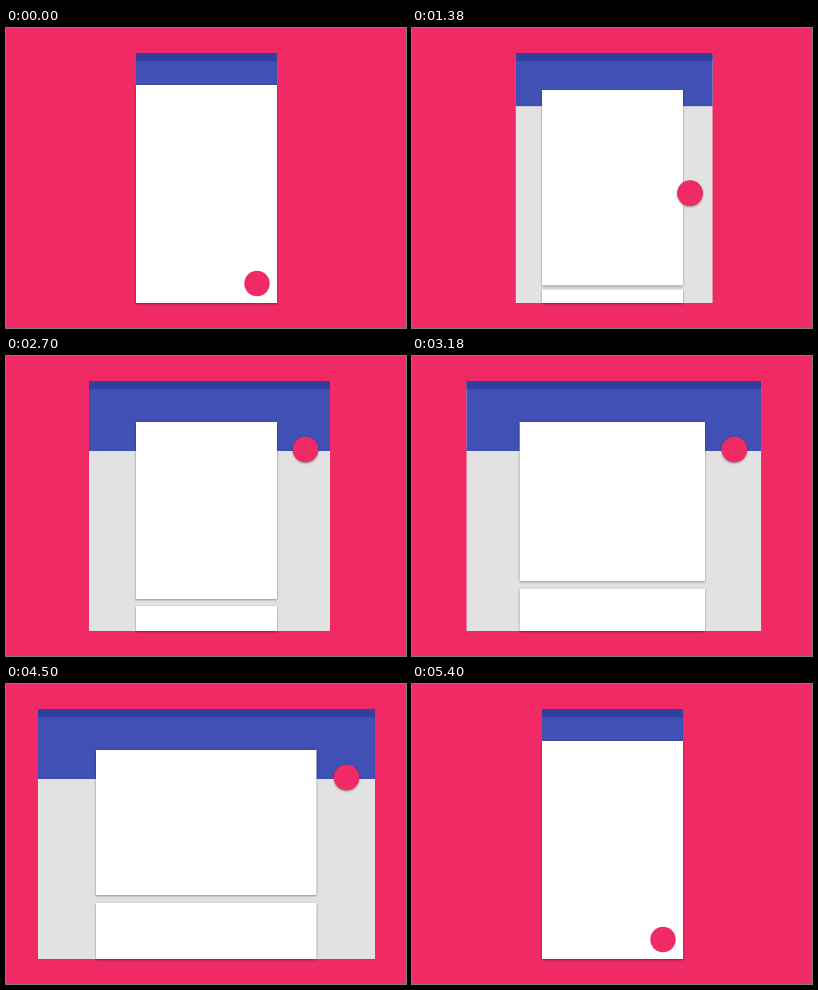
Recreate the animation shown at these times as an HTML page. Size 400x300 px, loop 7.2 s.

```html
<!DOCTYPE html>
<html lang="en">
<head>
<meta charset="utf-8">
<title>Responsive layout</title>
<style>
html, body { margin: 0; width: 100%; height: 100%; overflow: hidden; background: #f02a65; }
svg { display: block; width: 100%; height: 100%; }
</style>
</head>
<body>
<svg viewBox="0 0 400 300">
  <defs>
    <filter id="shade" filterUnits="userSpaceOnUse" x="0" y="0" width="400" height="300" color-interpolation-filters="sRGB">
      <feDropShadow dx="0" dy="0.8" stdDeviation="0.8" flood-color="#000" flood-opacity="0.42"/>
    </filter>
    <linearGradient id="soft" x1="0" y1="0" x2="0" y2="1">
      <stop offset="0" stop-color="#dcdcdc"/>
      <stop offset="1" stop-color="#fff"/>
    </linearGradient>
  </defs>
  <rect width="400" height="300" fill="#f02a65"/>
  <rect id="page" fill="#e2e2e2"/>
  <rect id="toolbar" fill="#4150b5"/>
  <rect id="status" fill="#3040a0"/>
  <rect id="lower" fill="#fff" filter="url(#shade)"/>
  <rect id="edge" fill="url(#soft)"/>
  <rect id="card" fill="#fff" filter="url(#shade)"/>
  <circle id="fabShade" r="12.7" fill="#f02a65" filter="url(#shade)"/>
  <circle id="fab" r="12.7" fill="#f02a65"/>
</svg>
<script>
const LOOP = 7200, STEP = 30, MOVE = 900, TOP = 25, BOTTOM = 275;
const STARTS = [900, 2700, 4500];

const phone = { left: 130, right: 271, bar: 57, cardL: 130, cardR: 271, cardT: 57, cardB: 275.5, lowerT: 276, fabX: 251, fabY: 255.5, lift: 0 };
const tablet = { left: 83, right: 324, bar: 95, cardL: 130, cardR: 271, cardT: 66, cardB: 243, lowerT: 250, fabX: 299.5, fabY: 93.5, lift: 1 };
const desktop = { left: 32, right: 369, bar: 95, cardL: 90, cardR: 310.5, cardT: 66, cardB: 211, lowerT: 219, fabX: 340.5, fabY: 93.5, lift: 1 };
const layouts = [phone, tablet, desktop, phone];

const el = id => document.getElementById(id);

function set(id, attrs) {
  for (const key in attrs) el(id).setAttribute(key, attrs[key]);
}

function box(id, x1, y1, x2, y2) {
  set(id, { x: x1, y: y1, width: x2 - x1, height: Math.max(0, y2 - y1) });
}

// cubic-bezier(.42, 0, .58, 1), solved by bisection
function ease(x) {
  if (x <= 0 || x >= 1) return Math.min(1, Math.max(0, x));
  let lo = 0, hi = 1, s = 0.5;
  for (let i = 0; i < 24; i++) {
    s = (lo + hi) / 2;
    const bx = 1.26 * (1 - s) * (1 - s) * s + 1.74 * (1 - s) * s * s + s * s * s;
    if (bx < x) lo = s; else hi = s;
  }
  return s * s * (3 - 2 * s);
}

function layoutAt(t) {
  let i = 0;
  while (i < 2 && t >= STARTS[i + 1]) i++;
  const k = ease((t - STARTS[i]) / MOVE);
  const from = layouts[i], to = layouts[i + 1], now = {};
  for (const key in from) now[key] = from[key] + (to[key] - from[key]) * k;
  now.blur = i === 2 ? 4 * k * (1 - k) : 0;
  return now;
}

function draw(time) {
  const t = Math.floor((time % LOOP) / STEP) * STEP;
  const s = layoutAt(t);
  box("page", s.left, TOP, s.right, BOTTOM);
  box("toolbar", s.left, TOP, s.right, s.bar);
  box("status", s.left, TOP, s.right, 33.3);
  box("lower", s.cardL, s.lowerT, s.cardR, BOTTOM);
  box("edge", s.cardL, s.lowerT, s.cardR, Math.min(BOTTOM, s.lowerT + 4));
  set("edge", { opacity: s.blur });
  box("card", s.cardL, s.cardT, s.cardR, Math.min(BOTTOM, s.cardB));
  set("fabShade", { cx: s.fabX, cy: s.fabY, opacity: Math.min(1, s.lift * 2) });
  set("fab", { cx: s.fabX, cy: s.fabY });
}

function tick() {
  draw(performance.now());
  requestAnimationFrame(tick);
}
tick();
</script>
</body>
</html>
```
